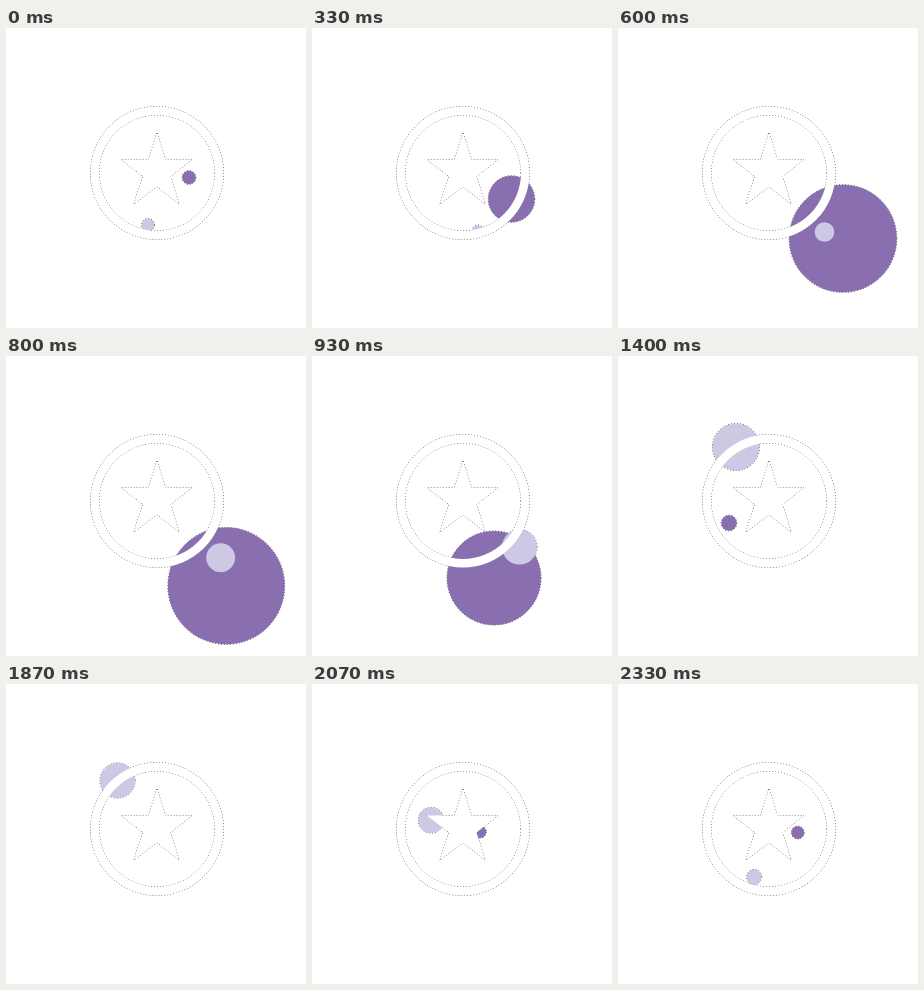
Recreate the animation shown at these times as an HTML page with a canvas. Size 300 px wide and 300 px high, loop 2390 ms.

```html
<!DOCTYPE html>
<html>
<head>
<meta charset="utf-8">
<style>
  html, body { margin: 0; width: 100%; height: 100%; overflow: hidden; background: #fff; }
  canvas { display: block; }
</style>
</head>
<body>
<canvas id="stage" width="300" height="300"></canvas>
<script>
const ctx = document.getElementById('stage').getContext('2d');
const LOOP = 2390, STEPS = 36;

// Each ball follows a closed path (step, x, y) and swells once per loop
const balls = [
  {
    color: '#8a6fb0', min: 6.2, grow: 53.8, peak: 11, sharpness: 4,
    path: [[0, 183, 149.5], [5, 199.5, 171], [11, 229, 227], [14, 182, 222],
           [17, 112, 181], [21, 111, 167], [25, 146, 153]]
  },
  {
    color: '#cdc8e4', min: 5.3, grow: 18.2, peak: 21, sharpness: 1,
    path: [[0, 142, 197], [5, 166, 203], [9, 206.5, 204], [14, 207.5, 191],
           [21, 118, 91], [28, 111.5, 96.5], [34, 131, 184]]
  }
];

function keyAt(path, i) {
  const n = path.length, lap = Math.floor(i / n);
  const [step, x, y] = path[i - lap * n];
  return [step + lap * STEPS, x, y];
}

// Smooth closed curve through the path points
function position(path, step) {
  const i = path.findLastIndex(key => key[0] <= step);
  const [a, b, c, d] = [-1, 0, 1, 2].map(k => keyAt(path, i + k));
  const span = c[0] - b[0], u = (step - b[0]) / span, v = 1 - u;
  return [1, 2].map(k => {
    const m0 = (c[k] - a[k]) / (c[0] - a[0]) * span;
    const m1 = (d[k] - b[k]) / (d[0] - b[0]) * span;
    return b[k] * v * v * (1 + 2 * u) + c[k] * u * u * (3 - 2 * u) + m0 * u * v * v - m1 * u * u * v;
  });
}

function radius({ min, grow, peak, sharpness }, step) {
  return min + grow * Math.cos(Math.PI * (step - peak) / STEPS) ** (2 * sharpness);
}

function disc(x, y, r) {
  const path = new Path2D();
  path.arc(x, y, r, 0, 2 * Math.PI);
  return path;
}

const ring = disc(151, 145, 66.5);
ring.addPath(disc(151, 145, 58));
const star = new Path2D('M151 105L159.5 131.5H186L164.5 148.5L173 176L151 158.5L128 176L137 148.5L115 131.5H142.5Z');

function draw(now) {
  const step = Math.floor((now % LOOP + 3) / LOOP * STEPS) % STEPS;
  const shapes = [
    ...balls.map(ball => [disc(...position(ball.path, step), radius(ball, step)), ball.color]),
    [ring, '#fff'],
    [star, '#fff']
  ];
  ctx.clearRect(0, 0, 300, 300);
  ctx.lineWidth = 0.9;
  ctx.setLineDash([1, 2]);
  // Dotted hairlines lie under every fill, so they show only against the background
  for (const [path] of shapes) ctx.stroke(path);
  for (const [path, color] of shapes) {
    ctx.fillStyle = color;
    ctx.fill(path, 'evenodd');
  }
  requestAnimationFrame(draw);
}
draw(performance.now());
</script>
</body>
</html>
```
